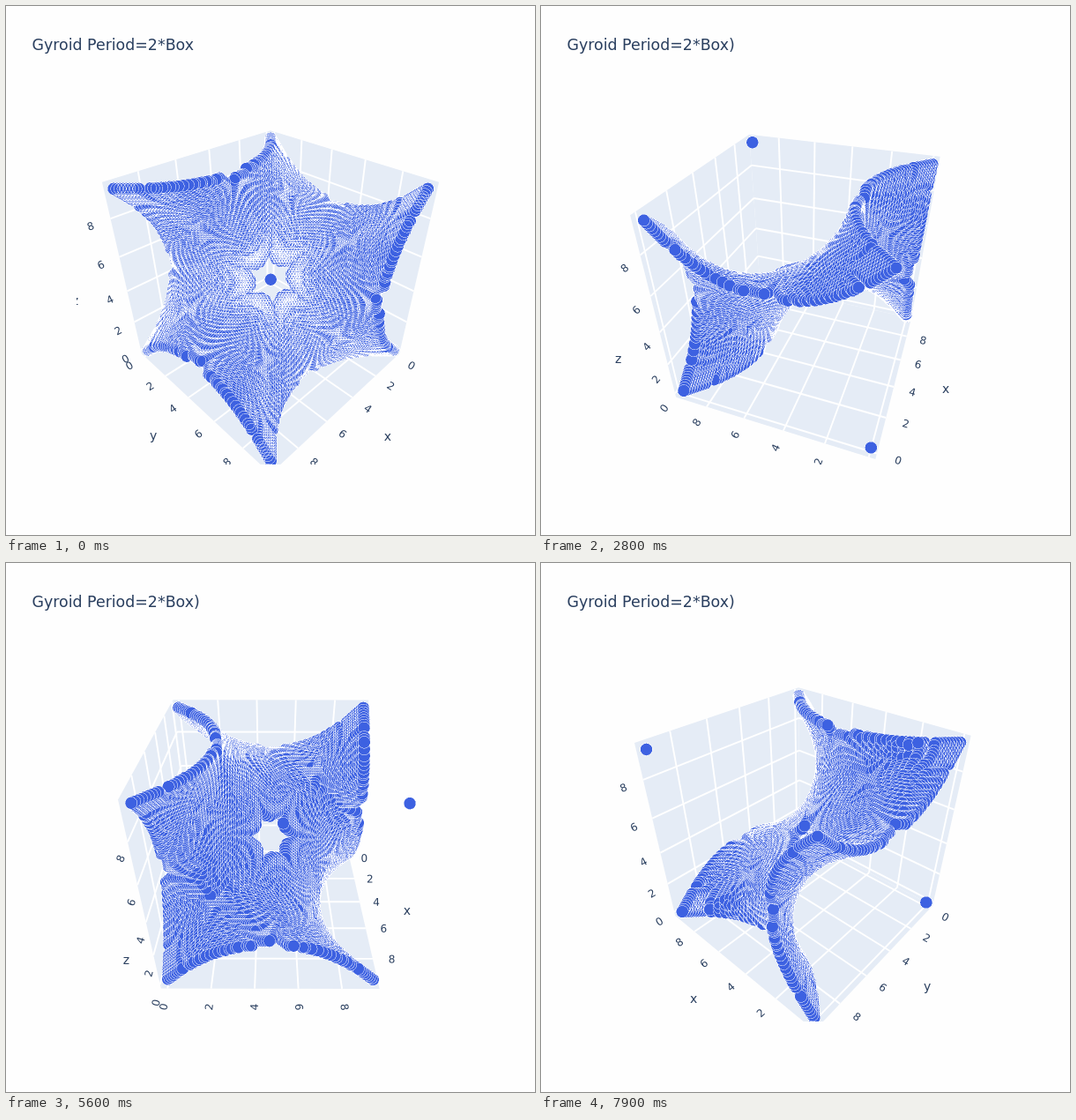
Animation of 600x600 px, one loop 8 s. Source, as an HTML page with a canvas:

```html
<!DOCTYPE html>
<html>
<head>
<meta charset="utf-8">
<style>
html, body { margin: 0; width: 100%; height: 100%; overflow: hidden; background: #fefefe; }
canvas { display: block; }
</style>
</head>
<body>
<canvas id="stage" width="600" height="600"></canvas>
<script>
const ctx = document.getElementById('stage').getContext('2d');
const FONT = 'Verdana, "DejaVu Sans", sans-serif', INK = '#2a3f5f';

// Scene viewport, rendered at twice the size and scaled down
const LEFT = 80, TOP = 100, VW = 440, VH = 420, W = VW * 2, H = VH * 2;
const FOCAL = VH / 2 / Math.tan(Math.PI / 8);
const DIST = 1.25 * Math.sqrt(3), CP = Math.sqrt(2 / 3), SP = Math.sqrt(1 / 3);
const FIT = 16 / 17; // share of the box taken by the data

const layer = document.createElement('canvas');
layer.width = W;
layer.height = H;
const layerCtx = layer.getContext('2d');
const image = layerCtx.createImageData(W, H);
const pixels = new Uint32Array(image.data.buffer);
const zbuf = new Int32Array(W * H);
const BLUE = 0xffe1613d, WHITE = 0xffffffff, RADIUS = 13.8, NUDGE = 0.5;

const ring = Array.from({ length: 80 }, (_, i) => {
  const a = i / 80 * 2 * Math.PI;
  return [RADIUS * Math.cos(a), RADIUS * Math.sin(a)];
});

const points = gyroid(100, 0.01);
const screen = new Float64Array(points.length);

// Grid points close to the zero level of a gyroid, half a period per side
function gyroid(n, tolerance) {
  const s = [], c = [], q = [], out = [];
  for (let i = 0; i < n; i++) {
    const a = Math.PI * i / (n - 1);
    s.push(Math.sin(a));
    c.push(Math.cos(a));
    q.push((i / (n - 1) - 0.5) * FIT);
  }
  for (let i = 0; i < n; i++)
    for (let j = 0; j < n; j++)
      for (let k = 0; k < n; k++)
        if (Math.abs(s[i] * c[j] + s[j] * c[k] + s[k] * c[i]) < tolerance)
          out.push(q[i], q[j], q[k]);
  return out;
}

let ca = 1, sa = 0;

function project(x, y, z) {
  const p = x * ca + y * sa;
  const depth = DIST - p * CP - z * SP, k = FOCAL / depth;
  return [300 + (y * ca - x * sa) * k, 310 - (z * CP - p * SP) * k, depth];
}

function path(corners) {
  ctx.beginPath();
  for (const c of corners) ctx.lineTo(...project(...c));
}

const tickPos = v => (v / (3 * Math.PI) - 0.5) * FIT;
const TICKS = [0, 2, 4, 6, 8];

function drawWalls(wall) {
  ctx.fillStyle = '#e5ecf6';
  for (let i = 0; i < 3; i++) {
    const j = (i + 1) % 3, k = (i + 2) % 3;
    path([[-1, -1], [1, -1], [1, 1], [-1, 1]].map(([a, b]) => {
      const p = [];
      p[i] = wall[i];
      p[j] = a / 2;
      p[k] = b / 2;
      return p;
    }));
    ctx.fill();
  }
  ctx.strokeStyle = '#fff';
  ctx.lineWidth = 1.9;
  for (let i = 0; i < 3; i++)
    for (const v of TICKS)
      for (const j of [(i + 1) % 3, (i + 2) % 3]) {
        const a = wall.slice();
        a[i] = tickPos(v);
        const b = a.slice();
        a[j] = -0.5;
        b[j] = 0.5;
        path([a, b]);
        ctx.stroke();
      }
}

function drawPoints() {
  zbuf.fill(1 << 30);
  pixels.fill(0);
  for (let i = 0; i < points.length; i += 3) {
    const [px, py, depth] = project(points[i], points[i + 1], points[i + 2]);
    const x = (px - LEFT) * 2 + NUDGE, y = (py - TOP) * 2 + NUDGE;
    const d = Math.round(depth * 36000);
    screen[i] = x;
    screen[i + 1] = y;
    screen[i + 2] = d;
    const yEnd = Math.min(H - 1, Math.floor(y + RADIUS - 0.5));
    for (let row = Math.max(0, Math.ceil(y - RADIUS - 0.5)); row <= yEnd; row++) {
      const dy = row + 0.5 - y, half = Math.sqrt(Math.max(0, RADIUS * RADIUS - dy * dy));
      const from = row * W + Math.max(0, Math.ceil(x - half - 0.5));
      const to = row * W + Math.min(W - 1, Math.floor(x + half - 0.5));
      for (let o = from; o <= to; o++)
        if (d < zbuf[o]) {
          zbuf[o] = d;
          pixels[o] = BLUE;
        }
    }
  }
  // Outlines come after all fills, so points of equal depth show every ring
  for (let i = 0; i < points.length; i += 3) {
    const d = screen[i + 2];
    for (const [dx, dy] of ring) {
      const x = Math.floor(screen[i] + dx), y = Math.floor(screen[i + 1] + dy);
      if (x < 0 || y < 0 || x >= W || y >= H) continue;
      const o = y * W + x;
      if (d <= zbuf[o]) {
        zbuf[o] = d;
        pixels[o] = WHITE;
      }
    }
  }
  layerCtx.putImageData(image, 0, 0);
  ctx.imageSmoothingEnabled = true;
  ctx.drawImage(layer, LEFT, TOP, VW, VH);
}

function label(text, size, x, y, angle) {
  ctx.save();
  ctx.translate(x, y);
  ctx.rotate(angle);
  ctx.font = size + 'px ' + FONT;
  ctx.textAlign = 'center';
  const m = ctx.measureText(text);
  ctx.fillText(text, 0, (m.actualBoundingBoxAscent - m.actualBoundingBoxDescent) / 2);
  ctx.restore();
}

function drawAxes(nx, ny) {
  const zOnX = -ny * ca - nx * sa < 0; // which silhouette edge is on the left
  const edges = [
    (t, d) => [t, ny * (0.5 + d), -0.5],
    (t, d) => [nx * (0.5 + d), t, -0.5],
    (t, d) => zOnX ? [nx * (0.5 + d), -ny / 2, t] : [-nx / 2, ny * (0.5 + d), t]
  ];
  ctx.fillStyle = INK;
  edges.forEach((edge, i) => {
    for (const v of TICKS) {
      const t = tickPos(v);
      const [x0, y0] = project(...edge(t, 0)), [x, y] = project(...edge(t, 0.094));
      label(String(v), 12, x, y, Math.atan((y - y0) / (x - x0)));
    }
    const [x, y] = project(...edge(0, 0.249));
    label('xyz'[i], 14, x, y, 0);
  });
}

function draw(frame) {
  const angle = Math.PI / 4 + 0.1 * Math.max(0, frame - 1);
  ca = Math.cos(angle);
  sa = Math.sin(angle);
  const nx = Math.sign(ca), ny = Math.sign(sa);

  ctx.fillStyle = '#fefefe';
  ctx.fillRect(0, 0, 600, 600);
  ctx.fillStyle = INK;
  ctx.font = '17.4px ' + FONT;
  ctx.fillText('Gyroid Period=2*Box' + (frame ? ')' : ''), 29.5, 50);

  ctx.save();
  ctx.beginPath();
  ctx.rect(LEFT, TOP, VW, VH);
  ctx.clip();
  drawWalls([-nx / 2, -ny / 2, -0.5]);
  drawPoints();
  drawAxes(nx, ny);
  ctx.restore();
}

let shown = -1;
const start = performance.now();
function tick() {
  const frame = Math.floor((performance.now() - start) / 100) % 80;
  if (frame !== shown) draw(shown = frame);
  requestAnimationFrame(tick);
}
tick();
</script>
</body>
</html>
```
